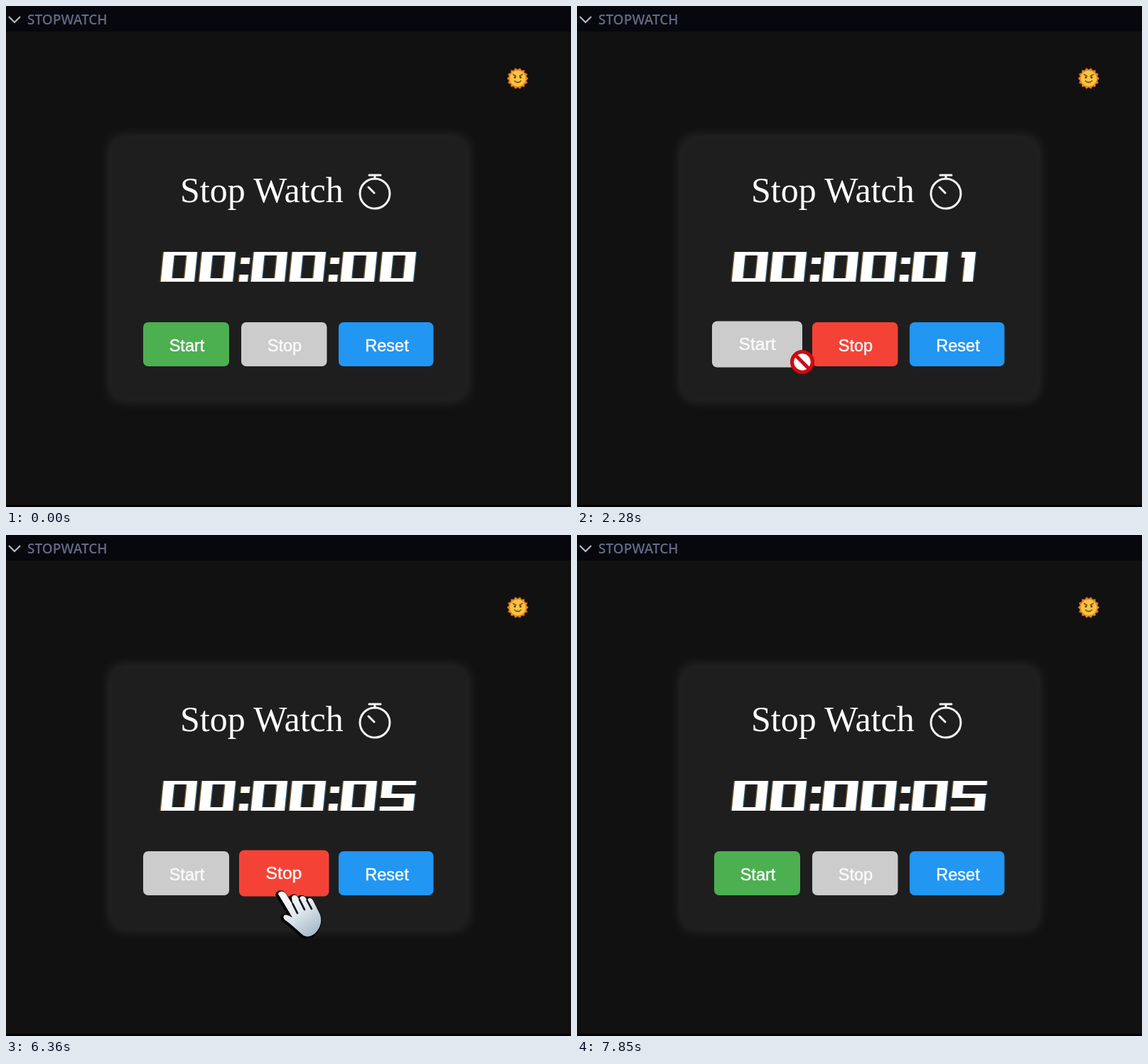
Recreate the animation shown at these times as an HTML page. Size 795 px wide and 705 px high, loop 7.97 s.

```html
<!DOCTYPE html>
<html lang="en">
<head>
<meta charset="utf-8">
<title>Stopwatch</title>
<style>
  html, body { margin: 0; width: 100%; height: 100%; overflow: hidden; background: #111; }
  svg { position: absolute; left: 0; top: 0; display: block; }
  .card {
    position: absolute; left: 148px; top: 186px; width: 500px; height: 367px;
    border-radius: 15px; background: #1e1e1e;
    box-shadow: 0 0 20px rgba(255, 255, 255, .15);
  }
  .head { font: 600 19px "Open Sans", sans-serif; fill: #636a85; }
  .title { font: 50px "Liberation Serif", serif; fill: #fff; }
  .label {
    font: 23.5px "Liberation Sans", sans-serif; text-anchor: middle;
    fill: #fafafa; stroke: #fafafa; stroke-width: .5;
  }
  .line { fill: none; stroke: #f4f4f4; stroke-width: 3; stroke-linecap: round; }
</style>
</head>
<body>
<div class="card"></div>
<svg width="795" height="705" viewBox="0 0 795 705">
  <defs>
    <linearGradient id="skin" x1="0" y1="0" x2=".7" y2="1">
      <stop offset="0" stop-color="#fff"/>
      <stop offset=".5" stop-color="#e4ebf1"/>
      <stop offset="1" stop-color="#a9bccb"/>
    </linearGradient>
    <path id="palm" d="M1,4C2,-1 9,-1 12,4L22,20L20,10C20,5 26,4 29,9L31,12C31,6 37,5 40,10L42,13C43,8 49,9 51,15L60,33C63,43 60,51 55,57C49,64 40,66 35,61C29,56 20,47 10,40C6,35 10,32 15,34L21,37Z"/>
    <path id="tip" d="M0,0V37L9,30L15,43L22,40L16,27H27Z"/>
    <g id="digits"></g>
  </defs>

  <rect width="795" height="36" fill="#07080e"/>
  <rect y="702" width="795" height="3" fill="#000"/>
  <path d="M4,15L12,23L20,15" fill="none" stroke="#b6bac2" stroke-width="2.2"/>
  <text class="head" x="30" y="25.5">STOPWATCH</text>

  <g transform="translate(720 102)">
    <path id="rays" fill="#e58a2c" stroke="#a94a1c" stroke-width=".8"/>
    <circle r="11" fill="#f8c63f"/>
    <path d="M-7,-6L-2,-3M7,-6L2,-3M-5,3Q0,8 5,3" fill="none" stroke="#8a4a18" stroke-width="1.7"/>
    <circle cx="-4" cy="-1.5" r="1.5" fill="#6b3714"/>
    <circle cx="4" cy="-1.5" r="1.5" fill="#6b3714"/>
  </g>

  <text class="title" x="245" y="276">Stop Watch</text>
  <g class="line">
    <circle cx="519" cy="264" r="21"/>
    <path d="M511,238H527M519,238V243M510,255L518,263"/>
  </g>

  <use href="#digits" x="-1.4" fill="#b08a45" opacity=".6"/>
  <use href="#digits" x="1.4" fill="#3c7da6" opacity=".6"/>
  <use href="#digits" fill="#fff"/>

  <g id="buttons"></g>

  <g id="cursor">
    <g id="arrow">
      <use href="#tip" x="-1" y="1" fill="#000" stroke="#000" stroke-width="4"/>
      <use href="#tip" fill="url(#skin)"/>
    </g>
    <g id="hand">
      <use href="#palm" x="-1.5" y="1" fill="#000" stroke="#000" stroke-width="4.5" stroke-linejoin="round"/>
      <use href="#palm" fill="url(#skin)"/>
      <path d="M21.5,18L28,31M31,12L38,26M41.5,13L48,25" stroke="#111" stroke-width="2.6" stroke-linecap="round"/>
    </g>
    <g id="ban">
      <circle r="17" fill="#a3060c"/>
      <circle r="14" fill="#fff" stroke="#cf0a12" stroke-width="4.6"/>
      <path d="M-9.5,-9.5L9.5,9.5" stroke="#cf0a12" stroke-width="5"/>
    </g>
  </g>
</svg>
<script>
const LOOP = 7970;
const PRESS = 1120, HALT = 6620;
const GREEN = [76, 175, 80], RED = [244, 67, 54], BLUE = [33, 150, 243], GREY = [204, 204, 204];
const $ = id => document.getElementById(id);

// Outline of each digit in a 47 x 42 box, before the slant
const GLYPHS = {
  0: 'M0,0H47V42H0ZM15,5V37H33V5Z',
  1: 'M12,0H31V42H17V8H12Z',
  2: 'M0,0H47V24H14V36H47V42H0V18H33V6H0Z',
  3: 'M0,0H47V42H0V36H33V24H4V18H33V6H0Z',
  4: 'M0,0H14V18H33V0H47V42H33V24H0Z',
  5: 'M0,0H47V6H14V18H47V42H0V36H33V24H0Z',
  ':': 'M1,8H13V17H1ZM1,32H13V42H1Z'
};
const SLOTS = [218, 272, 327, 345, 399, 453, 471, 526];
const TICKS = [2120, 3160, 4140, 5050, 6160];

// time, x, y of the pointer
const PATH = [
  [120, 140, 650], [400, 178, 570], [680, 203, 500], [800, 205, 483],
  [1500, 205, 483], [1900, 258, 494], [2280, 317, 501], [2360, 325, 513],
  [2460, 338, 529], [2580, 372, 532], [2720, 381, 505], [2780, 382, 502],
  [6850, 382, 501], [7050, 383, 516], [7330, 384, 538]
];
// start time and shape of the pointer
const SHAPES = [
  [0, ''], [120, 'arrow'], [680, 'hand'], [PRESS, 'ban'], [2350, 'arrow'],
  [2680, 'hand'], [HALT, 'ban'], [7000, 'arrow'], [7440, '']
];

const ease = p => 1 - Math.pow(1 - Math.min(1, Math.max(0, p)), 2.3);
const level = (t, on, off) => ease((t - on) / 300) - ease((t - off) / 300);
const mix = (a, b, p) => `rgb(${a.map((v, i) => Math.round(v + (b[i] - v) * p))})`;

// The picture refreshes about every 98 ms, on a 40 ms clock
function snap(t) {
  const [base, off] = t < 4000 ? [0, 40] : [6650, 32];
  const gap = 880 / 9;
  const at = k => base + 40 * Math.floor((off + gap * k) / 40);
  let k = Math.ceil((t - base) / gap) + 1;
  while (at(k) > t) k--;
  return Math.max(0, at(k));
}

function place(t) {
  let i = PATH.findIndex(p => p[0] > t);
  if (i === 0) return PATH[0].slice(1);
  if (i < 0) return PATH[PATH.length - 1].slice(1);
  const [t0, x0, y0] = PATH[i - 1], [t1, x1, y1] = PATH[i];
  const p = (t - t0) / (t1 - t0);
  return [x0 + (x1 - x0) * p, y0 + (y1 - y0) * p];
}

function makeButton(label, x, w, textX) {
  const cx = x + w / 2;
  $('buttons').insertAdjacentHTML('beforeend',
    `<g><rect x="${x}" y="445" width="${w}" height="62" rx="7"/>
     <text class="label" x="${textX}" y="486">${label}</text></g>`);
  const g = $('buttons').lastElementChild;
  const rect = g.querySelector('rect'), text = g.querySelector('text');
  return (color, hover) => {
    const s = 1 + .05 * hover;
    g.setAttribute('transform', `translate(${cx} 476) scale(${s}) translate(${-cx} -476)`);
    text.setAttribute('transform', `translate(${-hover} ${-2 * hover})`);
    rect.setAttribute('fill', color);
  };
}

const start = makeButton('Start', 193, 121, 254.5);
const stop = makeButton('Stop', 331, 120.5, 392);
makeButton('Reset', 468, 133.5, 536)(mix(BLUE, BLUE, 0), 0);

const points = Array.from({ length: 28 }, (_, i) => {
  const a = i * Math.PI / 14, r = i % 2 ? 12.5 : 15;
  return `${(r * Math.cos(a)).toFixed(2)},${(r * Math.sin(a)).toFixed(2)}`;
});
$('rays').setAttribute('d', `M${points.join('L')}Z`);

let shown = -1;
function showCount(n) {
  if (n === shown) return;
  shown = n;
  $('digits').innerHTML = [...`00:00:0${n}`].map((c, i) =>
    `<path fill-rule="evenodd" transform="matrix(1 0 -.1 1 ${SLOTS[i] + 4} 346)" d="${GLYPHS[c]}"/>`
  ).join('');
}

function draw(now) {
  const t = now % LOOP, s = snap(t);
  showCount(TICKS.filter(v => v <= t).length);

  const run = level(s, PRESS, HALT);
  start(mix(GREEN, GREY, run), level(s, 680, 2350));
  stop(mix(GREY, RED, run), level(s, 2680, 7000));

  const shape = SHAPES.filter(v => v[0] <= s).pop()[1];
  for (const id of ['arrow', 'hand', 'ban'])
    $(id).setAttribute('visibility', id === shape ? 'visible' : 'hidden');
  $('cursor').setAttribute('transform', `translate(${place(s)})`);
}

const began = performance.now();
function tick() {
  draw(performance.now() - began);
  requestAnimationFrame(tick);
}
tick();
</script>
</body>
</html>
```
